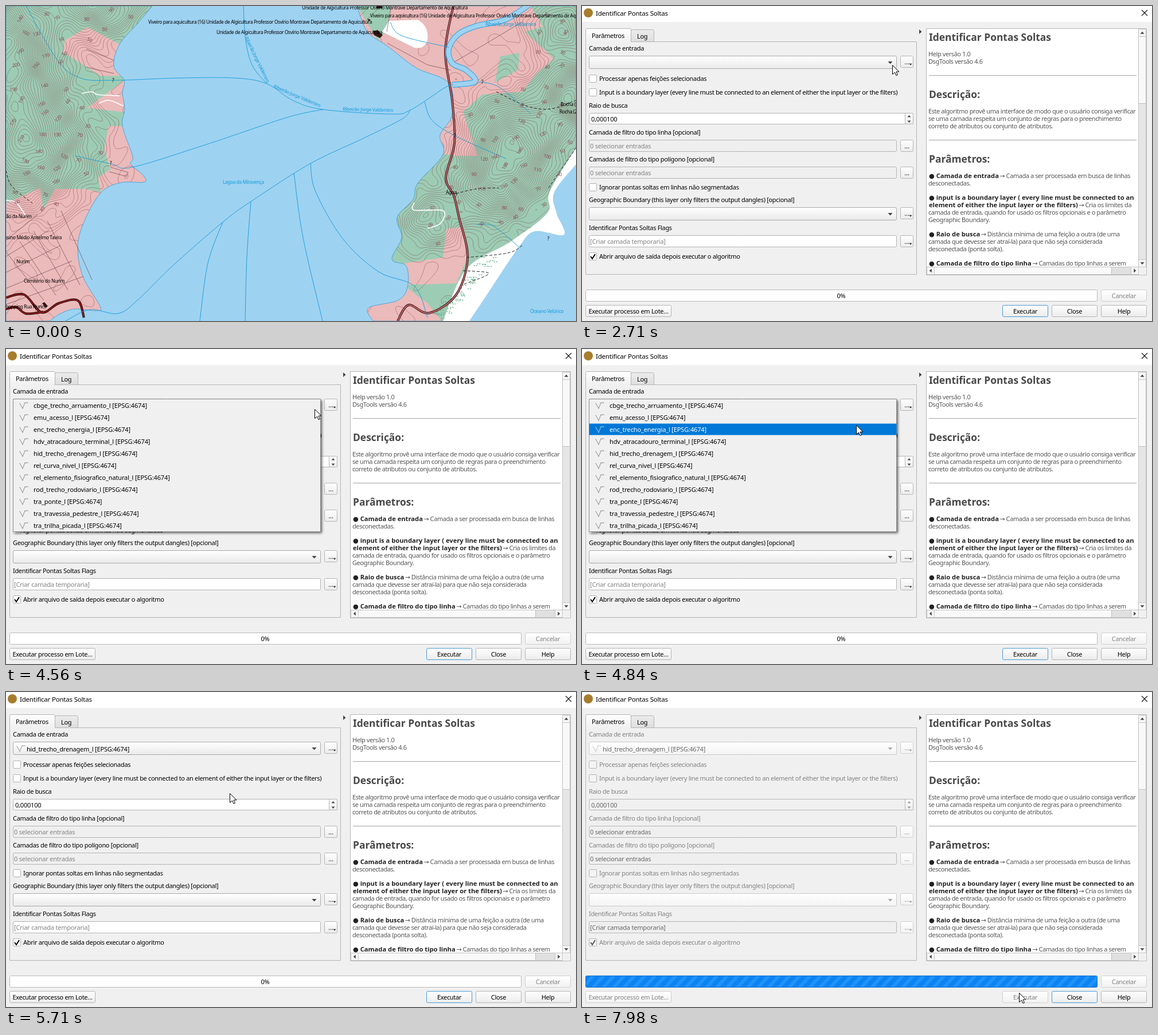
An HTML page with a canvas for the animation above (8 s loop, 994 by 551 pixels).

```html
<!DOCTYPE html>
<html lang="pt">
<head>
<meta charset="utf-8">
<style>
html, body { margin: 0; width: 100%; height: 100%; overflow: hidden; }
canvas { display: block; }
</style>
</head>
<body>
<canvas width="994" height="551"></canvas>
<script>
const W = 994, H = 551, LOOP = 8000;
const stage = document.querySelector('canvas').getContext('2d');
const mapCanvas = Object.assign(document.createElement('canvas'), { width: W, height: H });
const FACE = '"Noto Sans", "DejaVu Sans", sans-serif';
let g = mapCanvas.getContext('2d');

// ---- shared helpers ----
function text(s, x, y, { color = '#000', size = 11, weight = 400, track = -0.32, align = 'left' } = {}) {
  g.font = `${weight} ${size}px ${FACE}`;
  g.letterSpacing = track + 'px';
  g.textAlign = align;
  g.fillStyle = color;
  g.fillText(s, x, y + size * 0.36);
  return g.measureText(s).width;
}
function box(x, y, w, h, fill, stroke, r = 0) {
  g.beginPath();
  g.roundRect(x + 0.5, y + 0.5, w - 1, h - 1, r);
  if (fill) { g.fillStyle = fill; g.fill(); }
  if (stroke) { g.strokeStyle = stroke; g.lineWidth = 1; g.stroke(); }
}
function fillPath(d, color) { g.fillStyle = color; g.fill(new Path2D(d)); }
function strokePath(d, color, width = 1) {
  g.strokeStyle = color;
  g.lineWidth = width;
  g.stroke(new Path2D(d));
}
function clipped(d, draw) {
  g.save();
  g.clip(new Path2D(d));
  draw();
  g.restore();
}
const circle = r => `M${-r},0a${r},${r} 0 1 0 ${2 * r},0a${r},${r} 0 1 0 ${-2 * r},0`;
// Smooth path through "x,y x,y ..." points
function curve(points) {
  const p = points.split(' ').map(s => s.split(',').map(Number));
  let d = 'M' + p[0];
  for (let i = 0; i < p.length - 1; i++) {
    const a = p[i - 1] || p[i], b = p[i], c = p[i + 1], e = p[i + 2] || c;
    d += `C${b[0] + (c[0] - a[0]) / 6},${b[1] + (c[1] - a[1]) / 6} ${c[0] - (e[0] - b[0]) / 6},${c[1] - (e[1] - b[1]) / 6} ${c}`;
  }
  return d;
}
let seed = 7;
const random = () => (seed = seed * 16807 % 2147483647) / 2147483647;

// ---- map ----
const WATER = '#9ed2f1', GREEN = '#9dccb4', PINK = '#ebbaba', STREAM = '#129bdb';
// x, y, radius, top
const hills = [
  [35, 250, 88, 195], [-10, 60, 82, 200], [155, -20, 62, 150], [20, 150, 62, 85],
  [890, 238, 74, 165], [988, 155, 50, 160], [850, 315, 62, 105], [740, 375, 46, 75], [965, 40, 50, 80]
];
function height(x, y) {
  const noise = 5 * Math.sin(x * 0.09 + 2 * Math.sin(y * 0.05)) + 5 * Math.sin(y * 0.11 + 2 * Math.sin(x * 0.06));
  return hills.reduce((h, [cx, cy, r, top]) => h + top * Math.exp(-((x - cx) ** 2 + (y - cy) ** 2) / r ** 2), noise);
}
// Marching squares over the height field
function contours(interval, step) {
  g.beginPath();
  for (let x = 0; x < W; x += step) for (let y = 0; y < H; y += step) {
    const corners = [[x, y], [x + step, y], [x + step, y + step], [x, y + step]];
    const hs = corners.map(c => height(...c)), top = Math.max(...hs);
    for (let l = Math.max(interval, Math.ceil(Math.min(...hs) / interval) * interval); l <= top; l += interval) {
      const hits = [];
      for (let i = 0; i < 4; i++) {
        const j = (i + 1) % 4, a = hs[i], b = hs[j], k = (l - a) / (b - a);
        if ((a < l) !== (b < l)) hits.push(corners[i].map((v, n) => v + (corners[j][n] - v) * k));
      }
      if (hits.length > 1) { g.moveTo(...hits[0]); g.lineTo(...hits[1]); }
    }
  }
  g.strokeStyle = 'rgba(125,60,65,.55)';
  g.lineWidth = 0.75;
  g.stroke();
}
function label(s, x, y, color = '#000', angle = 0) {
  g.save();
  g.translate(x, y);
  g.rotate(angle);
  text(s, 0, 0, { color, size: 8.3, track: -0.35 });
  g.restore();
}
function heightLabels(land) {
  const area = new Path2D(land);
  for (let x = 5; x < W; x += 38) for (let y = 10; y < H; y += 30) {
    const px = x + random() * 26, py = y + random() * 20, h = Math.round(height(px, py) / 10) * 10;
    if (h > 20 && g.isPointInPath(area, px, py)) label(h, px, py, '#864a50', random() * 1.6 - 1.1);
  }
}
function drawMap() {
  g.fillStyle = WATER;
  g.fillRect(0, 0, W, H);
  const west = curve('255,0 230,30 198,67 188,105 206,130 203,152 207,180 203,210 221,263 217,276 239,296 241,308 200,309 165,327 135,380 125,425 135,475 164,525 158,533 120,530 95,538 76,551') + 'L0,551L0,0Z';
  const east = curve('612,0 630,45 665,70 715,108 772,135 778,190 757,226 762,260 718,310 710,338 682,370 690,405 673,443 698,455 700,492 683,515 632,528 640,551') + 'L994,551L994,0Z';
  fillPath(west + east, PINK);
  clipped(west, () => fillPath('M0,0H260L198,67 142,37 103,60 99,80 165,122 206,122 206,130 142,178 207,186 205,210 179,210 171,250 182,286 160,300 166,326 138,320 85,320 65,358 60,318 0,345Z', GREEN));
  clipped(east, () => {
    fillPath('M797,185L830,155 900,150 925,118 955,92 905,45 936,36 915,0H994V551H760L735,520 650,455 660,240 783,262 822,262Z', GREEN);
    fillPath('M612,0H672L663,45 648,60ZM862,88L895,82 893,112 852,134Z', GREEN);
    fillPath('M768,390L795,386 805,440 785,485 690,488 694,450 762,440ZM620,520L712,505 735,522 726,551H620Z', PINK);
  });
  clipped(west + east, () => contours(6, 4));
  strokePath(west + east, '#2e9fda', 0.8);

  // sand, ocean and marsh
  fillPath('M656,45L668,26 718,24Q738,35 735,60 730,76 712,73Z', '#fff');
  fillPath(curve('994,248 948,325 944,362 880,412 803,460 762,551') + 'H994Z', '#fff');
  fillPath(curve('994,277 956,326 960,362 973,400 922,394 894,422 840,503 808,551') + 'H994Z', WATER);
  for (let i = 0; i < 60; i++) {
    const y = 438 + random() * 108, x = 858 - (y - 438) * 0.86 - random() * 32;
    strokePath(`M${x},${y}l1,2 1,-2m2,0l1,2 1,-2`, '#57a982', 0.8);
  }

  // streets, trails and roads
  for (let i = 0; i < 5; i++) strokePath(`M${i * 24},${430 - i * 18}l${66 - i * 3},${85 + i * 9}M0,${410 + i * 28}L${55 + i * 20},${365 + i * 27}`, '#6f4a50', 0.7);
  strokePath('M140,75L188,95M140,107L188,118M182,282L213,291 210,298 180,290M665,65L735,103 775,112M672,0L664,45M778,100L830,70 900,28', '#6f4a50', 0.7);
  for (const s of ['132,153 150,150 160,155 198,157', '162,170 180,165 205,175', '0,340 18,344 35,368', '712,344 712,357 762,358 758,380 735,389'])
    strokePath(curve(s), '#fff', 1.7);
  const road = curve('780,0 766,80 778,165 782,240 767,300 781,332 790,370 805,440 785,505 738,537 702,523 683,551');
  strokePath(road, '#421c20', 4);
  strokePath(road, '#c96a6c', 1.8);
  const town = curve('0,510 32,505 62,536 92,520 125,515 136,545') + curve('0,530 18,527 35,538 65,535');
  strokePath(town, '#2c0808', 4);
  strokePath(town, '#a31f1f', 1.6);
  g.setLineDash([5, 3]);
  for (const s of ['855,150 908,175 950,180 994,165', '785,328 820,320 860,318', '803,440 875,432 900,419', '994,248 945,320', '797,463 842,468 795,488', '0,288 10,315 46,345'])
    strokePath(curve(s), '#222');
  g.setLineDash([]);

  // water courses
  const river = curve('912,-2 870,24 820,35 788,50 772,75 778,100 802,112 818,132 778,138');
  strokePath(river, '#2e9fda', 10);
  strokePath(river, WATER, 8);
  for (const s of [
    '35,0 90,95 130,126 187,130 300,126 400,126 455,136 500,165 553,181 670,189 705,182 765,143 780,138',
    '414,0 418,60 430,105 455,136', '120,262 183,276 220,282 350,242 490,195 553,181',
    '705,182 690,198 620,233 530,276 427,342 378,378 290,455 230,514 195,538 146,531 104,551',
    '427,342 420,440 417,551', '378,378 352,450 338,551', '502,292 518,405 552,551',
    '531,275 540,325 588,408 650,465 712,490 735,545', '730,168 743,200 785,228 872,267',
    '820,382 850,385 895,422', '825,133 860,142 915,188', '670,28 690,52 772,72'
  ]) strokePath(curve(s), STREAM, 0.9);
  fillPath('M640,44l8,-2 9,9 -5,5 -10,-5zM646,0h10v4h-10zM630,22l6,2 -3,3zM63,520l4,-2 6,7 -4,3z', '#351617');
  heightLabels(west + east);

  const brook = 'Ribeirão Jorge Valdemiro';
  label(brook, 419, 54, STREAM, 1.12);
  label(brook, 467, 140, STREAM, 0.4);
  label(brook, 587, 180, STREAM, 0.025);
  label(brook, 836, 32, STREAM);
  label('Lagoa da Miravença', 378, 308, STREAM);
  label('Oceano Velúrico', 914, 534, STREAM);
  const farm = 'Unidade de Algicultura Professor Osvírio Montrave Departamento de Aquicultura';
  const pond = 'Viveiro para aquicultura (16) ' + farm;
  label(farm, 516, 3);
  label(pond, 248, 28);
  label(farm, 367, 46);
  label(pond, 635, 17);
  label('Rocha (1)', 967, 172);
  label('Rocha (2)', 965, 185);
  label('Agua', 767, 326);
  label('ão da Nurim', 0, 368);
  label('nsino Médio Anselmo Tavira', -3, 405);
  label('Nurim', 18, 447);
  label('Cemitério do Nurim', 31, 481);
  label('hopping Rua Nurim', -1, 526);
  for (const [x, y] of [[185, 130], [181, 275], [829, 133], [781, 227], [783, 332], [944, 407]]) label('?', x, y);
}

// ---- dialog ----
const GREY = '#828282', EDGE = '#b4b4b4', FACE_GREY = '#f0f0f0';
const layers = ['cbge_trecho_arruamento_l', 'emu_acesso_l', 'enc_trecho_energia_l', 'hdv_atracadouro_terminal_l', 'hid_trecho_drenagem_l',
  'rel_curva_nivel_l', 'rel_elemento_fisiografico_natural_l', 'rod_trecho_rodoviario_l', 'tra_ponte_l', 'tra_travessia_pedestre_l', 'tra_trilha_picada_l'
].map(s => s + ' [EPSG:4674]');
const CHOICE = 4;
// Lines of help; the part before "|" is bold
const intro = ['Este algoritmo provê uma interface de modo que o usuário consiga verificar',
  'se uma camada respeita um conjunto de regras para o preenchimento', 'correto de atributos ou conjunto de atributos.'];
const params = [
  ['● Camada de entrada| → Camada a ser processada em busca de linhas', 'desconectadas.'],
  ['● input is a boundary layer ( every line must be connected to an|', 'element of either the input layer or the filters)| → Cria os limites da',
    'camada de entrada, quando for usado os filtros opcionais e o parâmetro', 'Geographic Boundary.'],
  ['● Raio de busca| → Distância mínima de uma feição a outra (de uma', 'camada que devesse ser atraí-la) para que não seja considerada', 'desconectada (ponta solta).'],
  ['● Camada de filtro do tipo linha| → Camadas do tipo linhas a serem']
];
let off = false; // whether the form is disabled
const ink = () => off ? GREY : '#000';

function sheen(y, h, to = '#ececec', from = '#fff') {
  const s = g.createLinearGradient(0, y, 0, y + h);
  s.addColorStop(0, from);
  s.addColorStop(1, to);
  return s;
}
function triangle(x, y, r, turns = 0, color = '#444') {
  g.save();
  g.translate(x, y);
  g.rotate(turns * Math.PI / 2);
  fillPath(`M${-r},${-r / 2}H${r}L0,${r / 2 + 0.5}Z`, color);
  g.restore();
}
function button(s, x, y, w, { dim = false, edge = EDGE, tint } = {}) {
  box(x, y, w, 21, tint || sheen(y, 21, dim ? '#f2f2f2' : '#ebebeb'), dim ? '#cfcfcf' : edge, 2);
  text(s, x + w / 2, y + 11, { align: 'center', color: dim ? GREY : '#000' });
}
function field(name, y, arrow) {
  text(name, 12, y - 12.5, { color: ink() });
  button('…', 555, y, 23, { dim: off });
  if (arrow) triangle(573, y + 15, 2.5, 0, off ? '#999' : '#333');
}
function combo(name, y) {
  field(name, y, true);
  box(12, y, 537, 23, sheen(y, 23, off ? '#f3f3f3' : '#eaeaea'), off ? '#cacaca' : '#a9a9a9', 2);
  triangle(537.5, y + 12, 4, 0, off ? '#aaa' : '#444');
}
function edit(name, y, value, fill, arrow) {
  field(name, y, arrow);
  box(12, y, 537, 21, off ? '#efefef' : fill, EDGE, 2);
  text(value, 14, y + 11, { color: off ? '#666' : GREY, track: -0.2 });
}
function check(s, y, on) {
  box(12, y - 7, 14, 14, off ? '#f4f4f4' : '#fff', '#b0b0b0', 1);
  if (on) strokePath(`M15,${y}l3,4 5,-8`, off ? '#555' : '#000', 2);
  text(s, 30, y, { color: ink() });
}
function spin(name, y, value) {
  text(name, 12, y - 13, { color: ink() });
  box(12, y, 566, 20, off ? FACE_GREY : '#fff', EDGE, 2);
  box(563, y, 15, 20, sheen(y, 20), EDGE, 2);
  triangle(570.5, y + 6, 3, 2, off ? '#999' : '#444');
  triangle(570.5, y + 15, 3, 0, off ? '#999' : '#444');
  text(value, 16, y + 11, { color: off ? '#666' : '#000', track: -0.2 });
}
function layerIcon(x, y, color) {
  strokePath(`M${x + 1},${y - 4}l5,9 4,-10h5`, color);
  for (const [dx, dy] of [[1, -4], [6, 5], [10, -5], [15, -5]]) box(x + dx - 1, y + dy - 1, 2, 2, color);
}
function knob(x, y, turns) {
  box(x, y, 14, 14, '#f6f6f6', '#c4c4c4');
  triangle(x + 7, y + 7, 3.5, turns);
}
function helpLine(line, y) {
  const [bold, plain] = line.includes('|') ? line.split('|') : ['', line];
  const w = bold && text(bold, 605, y, { weight: 700, size: 11.2, track: 0, color: '#222' });
  text(plain, 604 + +w, y, { track: -0.42, color: '#565656' });
}
function drawHelp() {
  box(600, 39, 385, 432, '#fff', '#b8b8b8');
  const heading = (s, y) => text(s, 605, y, { size: 17.4, weight: 700, track: 0, color: '#484848' });
  heading('Identificar Pontas Soltas', 55);
  ['Help versão 1.0', 'DsgTools versão 4.6'].forEach((s, i) => helpLine(s, 84 + 13 * i));
  heading('Descrição:', 155);
  intro.forEach((s, i) => helpLine(s, 184 + 13 * i));
  heading('Parâmetros:', 268);
  strokePath('M605,121.5H967M605,234.5H967', '#a2a2a2');
  let y = 297;
  for (const paragraph of params) {
    for (const line of paragraph) { helpLine(line, y); y += 13; }
    y += 12;
  }
  box(970, 40, 14, 416, '#e6e6e6', '#c4c4c4');
  box(970, 53, 14, 118, '#f8f8f8', '#c0c0c0');
  box(601, 456, 370, 14, '#e0e0e0', '#c4c4c4');
  box(614, 456, 310, 14, '#f9f9f9', '#c0c0c0');
  box(971, 457, 13, 13, FACE_GREY);
  knob(970, 40, 2);
  knob(970, 443, 0);
  knob(601, 456, 1);
  knob(957, 456, 3);
}
function drawFrame() {
  g.fillStyle = FACE_GREY;
  g.fillRect(0, 0, W, H);
  g.fillStyle = '#fff';
  g.fillRect(0, 0, W, 28);
  g.save();
  g.translate(11, 12);
  fillPath(circle(8), '#a77d2d');
  g.restore();
  text('Identificar Pontas Soltas', 24, 13, { size: 11.5, track: -0.2 });
  strokePath('M976,7l10,10m0,-10l-10,10', '#111', 1.1);
  box(6, 62, 578, 408, FACE_GREY, EDGE);
  box(85, 41, 41, 22, sheen(41, 22, '#dedede', '#ececec'), EDGE, [2, 2, 0, 0]);
  box(6, 39, 80, 24, sheen(39, 24, FACE_GREY), EDGE, [2, 2, 0, 0]);
  g.fillStyle = FACE_GREY;
  g.fillRect(7, 61, 78, 3);
  text('Parâmetros', 17, 52);
  text('Log', 96, 53);
  triangle(590, 45, 4, 3);
  for (let y = 248; y < 266; y += 3) box(592, y, 1.5, 1.5, '#bbb');
}
function drawForm(chosen) {
  combo('Camada de entrada', 87);
  if (chosen) {
    layerIcon(18, 99, off ? '#c4c4c4' : '#999');
    text(layers[CHOICE], 36, 100, { color: off ? '#666' : '#000', track: -0.2 });
  }
  check('Processar apenas feições selecionadas', 127);
  check('Input is a boundary layer (every line must be connected to an element of either the input layer or the filters)', 151);
  spin('Raio de busca', 187, '0,000100');
  edit('Camada de filtro do tipo linha [opcional]', 234, '0 selecionar entradas', '#efefef');
  edit('Camadas de filtro do tipo polígono [opcional]', 281, '0 selecionar entradas', '#efefef');
  check('Ignorar pontas soltas em linhas não segmentadas', 317);
  combo('Geographic Boundary (this layer only filters the output dangles) [opcional]', 352);
  edit('Identificar Pontas Soltas Flags', 401, '[Criar camada temporaria]', '#fff', true);
  check('Abrir arquivo de saída depois executar o algoritmo', 438, true);
}
function drawFooter(tint) {
  box(6, 496, 893, 21, off ? '#0a84f2' : '#fff', off ? '#0b6fc9' : '#b8b8b8', 2);
  if (off) clipped('M7,497h891v19h-891z', () => {
    for (let x = 0; x < 910; x += 18) strokePath(`M${x},518l20,-22`, 'rgba(60,165,255,.45)', 6);
  });
  else text('0%', 452, 507, { align: 'center' });
  button('Cancelar', 905, 496, 80, { dim: true });
  button('Executar processo em Lote…', 6, 523, 150, { dim: off });
  button('Executar', 733, 523, 80, { dim: off, edge: '#4a9ad4', tint });
  button('Close', 819, 523, 80, { edge: off ? '#4a9ad4' : EDGE });
  button('Help', 905, 523, 80);
}
function drawPopup(pointerY) {
  g.save();
  g.shadowColor = 'rgba(0,0,0,.6)';
  g.shadowBlur = 4;
  g.shadowOffsetX = g.shadowOffsetY = 2;
  box(12, 87, 537, 233, FACE_GREY);
  g.restore();
  box(12, 87, 537, 233, FACE_GREY, '#8c8c8c');
  const hover = Math.floor((pointerY - 88) / 21);
  layers.forEach((s, i) => {
    const y = 99 + i * 21, on = i > 0 && i === hover;
    if (on) box(12, y - 27 + 16, 537, 21, '#0078d7');
    layerIcon(23, y, on ? '#b9cbd9' : '#8b8b8b');
    text(s, 48, y, { color: on ? '#fff' : '#000', track: -0.14 });
  });
}

// ---- pointer: each move starts, ends, and arrives at x, y ----
const STEP = 67;
const moves = [
  [1840, 2580, 541, 103], [4560, 5240, 396, 172], [5370, 5560, 390, 177], [6480, 7070, 697, 490], [7140, 7470, 762, 526]
];
const smooth = p => p * p * (3 - 2 * p);
function pointer(t) {
  if (t < moves[0][0]) return null;
  let pos = [998, 235];
  for (const [start, end, ...goal] of moves) {
    if (t < start) break;
    const steps = Math.round((end - start) / STEP) + 1;
    const done = Math.floor((t - start) / (end - start) * (steps - 1) + 0.01) + 1;
    const k = smooth(Math.min(1, done / steps));
    pos = pos.map((v, i) => Math.round(v + (goal[i] - v) * k));
  }
  return pos;
}
function drawPointer([x, y], busy) {
  const arrow = 'M0,0V16L4,12.5 6.5,18 9,17 6.5,11.5H11.5Z';
  g.save();
  g.translate(x + 0.5, y + 0.5);
  if (busy) strokePath(circle(8), '#2b8fd6', 4);
  else {
    fillPath(arrow, '#fff');
    strokePath(arrow, '#000');
  }
  g.restore();
}

function render(t) {
  if (t < 970) return g.drawImage(mapCanvas, 0, 0);
  const pos = pointer(t);
  off = t >= 7980;
  drawFrame();
  drawForm(t >= 5710);
  drawHelp();
  drawFooter(off || t < 7340 ? null : t < 7840 ? '#f0f7fc' : '#d3e6f6');
  if (t >= 2910 && t < 5710) drawPopup(pos[1]);
  if (pos) drawPointer(pos, t >= 2910 && t < 3050);
}
function tick() {
  render(performance.now() % LOOP);
  requestAnimationFrame(tick);
}
drawMap();
g = stage;
tick();
</script>
</body>
</html>
```
